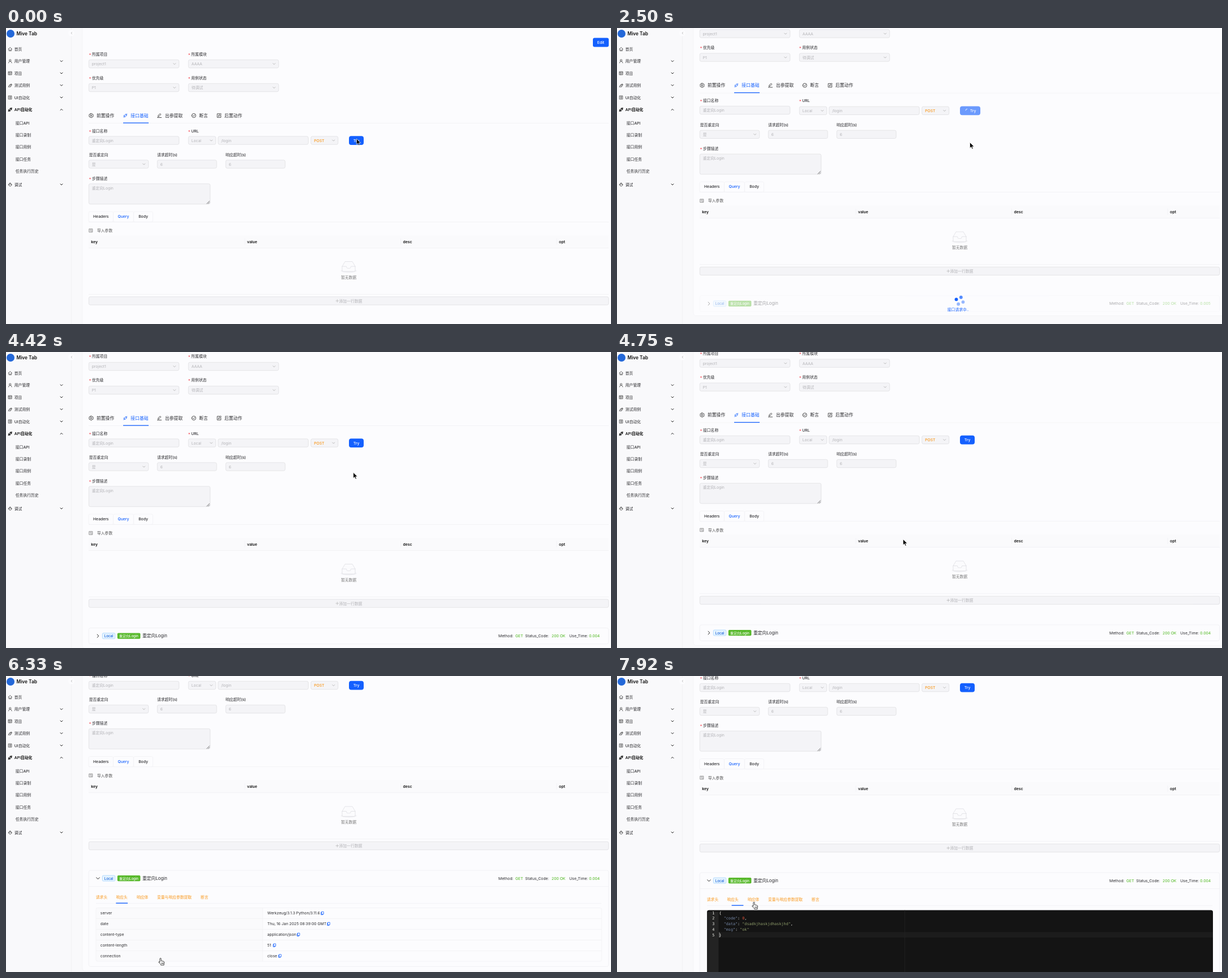
An HTML page for the animation above (8000 ms loop, 1069x524 px).

```html
<!DOCTYPE html>
<html lang="zh-CN">
<head>
<meta charset="utf-8">
<title>API test case</title>
<style>
html, body { margin: 0; width: 100%; height: 100%; overflow: hidden; background: #f9f9fb; }
svg { display: block; width: 100vw; height: 100vh; }
text { font: 6.8px Inter, 'Noto Sans CJK SC', 'Noto Sans CJK', sans-serif; fill: #2b2b2e; white-space: pre; }
.gray { fill: #b3b3b7; }
.dim { fill: #777; }
.med { font-weight: 500; }
.bold { font-weight: 600; fill: #111; }
.big { font-size: 7.8px; }
.mid { text-anchor: middle; }
.white { fill: #fff; }
.blue { fill: #1460fe; }
.green { fill: #4fb81f; }
.orange { fill: #f9981c; font-weight: 500; }
.tag { font-size: 6px; font-weight: 500; }
.code text { font: 6.78px 'DejaVu Sans Mono', monospace; fill: #f0f0ea; }
.icon { fill: none; stroke: #444; stroke-width: .8; stroke-linecap: round; stroke-linejoin: round; }
</style>
</head>
<body>
<svg id="stage" viewBox="0 0 1069 524"></svg>
<script>
const BLUE = '#1460fe', LINE = '#eeeef1';

// Drawing helpers: y of text is its visual centre
const text = (x, y, s, cls = '', more = '') => `<text x="${x}" y="${y + 2.5}" class="${cls}" ${more}>${s}</text>`;
const rect = (x, y, w, h, fill, more = '') => `<rect x="${x}" y="${y}" width="${w}" height="${h}" fill="${fill}" ${more}/>`;
const icon = (x, y, d, more = '') => `<path class="icon" transform="translate(${x} ${y})" d="${d}" ${more}/>`;
const hline = (x1, x2, y) => rect(x1, y, x2 - x1, .6, LINE);
const chevron = (x, y, more) => icon(x, y, 'M-2-1L0 1L2-1', more);
const label = (x, y, s) => text(x, y + 1, '*', 'med', 'style="fill:#f5333f"') + text(x + 5.3, y, s, 'med');
const field = (x, y, w, s, cls = 'gray', h = 15) =>
  rect(x + .3, y + .3, w - .6, h - .6, '#f4f4f7', 'rx="2.6" stroke="#d8d8db" stroke-width=".6"') + text(x + 5.7, y + 7.7, s, cls);
const select = (x, y, w, s, cls) => field(x, y, w, s, cls) + chevron(x + w - 8.3, y + 7.6, 'stroke="#aaa" style="stroke:#aaa"');

const ICONS = {
  home: 'M-3.2 0L0-3L3.2 0M-2.3-.6V3H2.3V-.6M0 3V1',
  user: 'M-2.8 3.2Q-2.6.2 0 .2T2.8 3.2M-1.6-1.5a1.6 1.6 0 1 0 3.2 0a1.6 1.6 0 1 0-3.2 0',
  list: 'M-2.8-2.8H2.8V2.8H-2.8ZM-2.8-1H2.8M-1.2-1V2.8M.3 1H1.6',
  tool: 'M-3 2.5L-1-1H3L1 2.5ZM-1 .8H1M0-1L2-2.6L3-1',
  panel: 'M-2.6-3H2.6V3H-2.6ZM-1.3-1.3H1.3M-1.3.2H1.3M-.6 1.7H.6',
  plug: 'M-3 3L-1.7 1.7M3-3L1.7-1.7M-1.9-.4L.4 1.9Q-1 3.2-2.2 2.2T-1.9-.4ZM1.9.4L-.4-1.9Q1-3.2 2.2-2.2T1.9.4Z',
  bug: 'M-2-1H2V1.4Q2 3 0 3T-2 1.4ZM-1.3-1Q-1.3-3 0-3T1.3-1M-3.2.6H-2M3.2.6H2',
  gear: 'M-1.3 0a1.3 1.3 0 1 0 2.6 0a1.3 1.3 0 1 0-2.6 0M-1-3.6H1L1.5-2.5L3-2.4L3.8-.8L3.1 0L3.8.8L3 2.4L1.5 2.5L1 3.6H-1L-1.5 2.5L-3 2.4L-3.8.8L-3.1 0L-3.8-.8L-3-2.4L-1.5-2.5Z',
  pen: 'M-3.6 3.5H3.6M-2.4 1.6L-2-.4L1.4-3.4L2.8-2L-.6 1.3Z',
  check: 'M-3.6 0a3.6 3.6 0 1 0 7.2 0a3.6 3.6 0 1 0-7.2 0M-1.6 0L-.3 1.3L1.8-1.2',
  edit: 'M1-3.2H-3.3V3.3H3.2V-.4M-1 1L-.7-.6L2.8-3.8L3.9-2.7L.6.7Z',
  load: 'M-2.8-2.8H2.8V2.8H-2.8ZM-1.3-1.2H1M-1.3.4L0 1.3M1.2.3V1.3',
  copy: 'M-1.2-2.6H2.2V1.6H-1.2ZM-1.2-1.4H-2.3V2.8H.8V1.7'
};

function sidebar() {
  const items = [['home', '首页', 37.3], ['user', '用户管理', 58.7], ['list', '项目', 80], ['tool', '测试用例', 101.4],
    ['panel', 'UI自动化', 123], ['plug', 'API自动化', 144.5], ['bug', '调试', 277]];
  const subs = ['接口API', '接口录制', '接口用例', '接口任务', '任务执行历史'];
  return rect(115, 0, .6, 524, '#ededf1')
    + '<circle cx="8" cy="10" r="7" fill="#2468d8"/>'
    + text(18.5, 10.2, 'Mive Tab', 'bold', 'style="font-size:8.3px"')
    + '<circle cx="115.5" cy="9" r="5.5" fill="#fcfcfe"/>' + icon(115.8, 9, 'M.8-1.7L-.8 0L.8 1.7', 'style="stroke:#999;stroke-width:.6"')
    + items.map(([ic, s, y], i) => icon(7.3, y, ICONS[ic], i == 5 ? 'style="stroke:#111;stroke-width:1.1"' : '')
      + text(14.8, y, s, i == 5 ? 'bold' : 'med')
      + (i ? icon(98, y, i == 5 ? 'M-2 1L0-1L2 1' : 'M-2-1L0 1L2-1', 'style="stroke:#222;stroke-width:1"') : '')).join('')
    + subs.map((s, i) => text(16.8, 168 + 21.45 * i, s, 'med')).join('');
}

function topForm() {
  const tabs = [[150.5, 'gear', '前置操作', 160], [210.8, 'plug', '接口基础', 220.3], [271, 'pen', '出参提取', 281],
    [331.8, 'check', '断言', 341.3], [376.5, 'edit', '后置动作', 386]];
  return rect(1037, 17.5, 28, 16, BLUE, 'rx="3"') + text(1051, 25.4, 'Edit', 'mid white med')
    + label(146.7, 46, '所属项目') + select(146, 56, 160, 'project1')
    + label(322, 46, '所属模块') + select(322, 56, 160, 'AAAA')
    + label(146.7, 88, '优先级') + select(146, 98, 160, 'P1')
    + label(322, 88, '用例状态') + select(322, 98, 160, '待调试')
    + hline(146, 1065, 168.3)
    + tabs.map(([x, ic, s, tx], i) => icon(x, 155, ICONS[ic], `style="stroke:${i == 1 ? BLUE : '#222'}"`)
      + text(tx, 155.2, s, 'big med' + (i == 1 ? ' blue' : ''))).join('')
    + rect(207, 167.4, 45, 1.3, BLUE)
    + label(146.7, 182, '接口名称') + field(146, 191.5, 160, '重定向Login') + label(322, 182, 'URL');
}

function lowForm() {
  const cols = [['key', 150.3], ['value', 426], ['desc', 701.5], ['opt', 977]];
  const tabs = [[146, 43.5, 'Headers'], [189.5, 36, 'Query'], [225.5, 34, 'Body']];
  return select(322, 191.5, 49, 'Local') + field(374.5, 191.5, 160, '/login')
    + select(538.5, 191.5, 48.5, 'POST', 'orange')
    + `<rect id="btn" x="606" y="191.2" height="15.8" rx="4" fill="${BLUE}"/>`
    + '<path id="arc" d="M0-3A3 3 0 0 1 3 0" fill="none" stroke="#fff" stroke-width=".8"/>'
    + text(0, 199.1, 'Try', 'mid white med', 'id="try"')
    + text(146.7, 224, '是否重定向', 'med') + select(146, 233.5, 106, '是')
    + text(267, 224, '请求超时(s)', 'med') + field(267, 233.5, 105.5, '6')
    + text(388, 224, '响应超时(s)', 'med') + field(388, 233.5, 105.5, '6')
    + label(146.7, 266, '步骤描述') + field(146, 275.5, 215, '重定向Login', 'gray', 36.5)
    + icon(357, 309, 'M-2.2 2L2.5-2.7M.3 2L2.5-.2', 'style="stroke:#555"')
    + hline(146, 1065, 343)
    + tabs.map(([x, w, s], i) => rect(x, 325, w, 18.3, '#fcfcfe', `rx="2.5" stroke="${LINE}" stroke-width=".6"`)
      + text(x + w / 2, 333.7, s, 'mid med' + (i == 1 ? ' blue' : ''))).join('')
    + icon(150, 358.5, ICONS.load, 'style="stroke:#666;stroke-width:.7"') + text(161, 358.5, '导入参数', '', 'style="fill:#555"')
    + rect(146, 367, 919, 22, '#fafafc') + hline(146, 1065, 389)
    + cols.map(([s, x], i) => text(x, 378, s, 'bold') + (i ? rect(x - 4.3, 372.5, .6, 11, LINE) : '')).join('')
    + '<ellipse cx="605.5" cy="430" rx="14" ry="3.2" fill="#f1f1f4"/>'
    + icon(605.5, 422, 'M-11.5 0L-6.5-8.5H6.5L11.5 0V7Q11.5 9 9.5 9H-9.5Q-11.5 9-11.5 7ZM-11.5 0H-4.5Q-3.5 0-3.5 1.5Q-3.5 3.3-2 3.3H2Q3.5 3.3 3.5 1.5Q3.5 0 4.5 0H11.5', 'style="fill:#fbfbfd;stroke:#d6d6da;stroke-width:.6"')
    + text(605.5, 441.4, '暂无数据', 'mid dim') + hline(146, 1065, 471)
    + rect(146.3, 475.8, 918.4, 14.4, '#f4f4f7', 'rx="2.6" stroke="#d8d8db" stroke-width=".6"')
    + icon(585.3, 483, 'M-2.4 0H2.4M0-2.4V2.4', 'style="stroke:#aaa;stroke-width:.6"')
    + text(588.5, 483, '添加一行数据', 'gray')
    + `<g id="card">${card()}</g>`
    + '<g id="spin">' + '<circle r="2.9" fill="#1460fe"/>'.repeat(4) + text(583.8, 551.5, '接口请求中..', 'blue med') + '</g>';
}

function card() {
  const rows = [['server', 'Werkzeug/3.1.3 Python/3.11.6', 559], ['date', 'Thu, 16 Jan 2025 08:39:00 GMT', 570],
    ['content-type', 'application/json', 516.7], ['content-length', '51', 474.4], ['connection', 'close', 484]];
  const tabs = [['请求头', 158.8], ['响应头', 194.5], ['响应体', 231], ['变量与响应参数提取', 267], ['断言', 344]];
  const table = rect(159, 593, 294, 94.5, '#fafafc')
    + rect(159, 593, 893.5, 94.5, 'none', `rx="3" stroke="${LINE}" stroke-width=".6"`) + rect(453, 593, .6, 94.5, LINE)
    + rows.map(([k, v, x], i) => {
      const y = 602.4 + 18.9 * i;
      return text(166.8, y, k) + text(461.8, y, v) + icon(x, y, ICONS.copy, `style="stroke:${BLUE}"`)
        + (i ? hline(159, 1052, y - 9.4) : '');
    }).join('');
  return '<rect id="frame" x="146.3" y="526.5" width="918.4" rx="3" fill="none" stroke="#eeeef1" stroke-width=".7"/>'
    + icon(162.5, 540.7, 'M-1.4-2.7L1.4 0L-1.4 2.7', 'id="fold" style="stroke:#222;stroke-width:1"')
    + rect(170.3, 535.6, 22.4, 10, '#e6f4ff', 'rx="1.8" stroke="#91caff" stroke-width=".6"') + text(181.5, 540.5, 'Local', 'mid tag', 'style="fill:#0958d9"')
    + rect(196.8, 535.4, 40.6, 10.4, '#58b92c', 'rx="1.8"') + text(217, 540.5, '重定向Login', 'mid tag white')
    + text(241, 540.6, '重定向Login', 'big')
    + text(870, 540.5, 'Method:') + text(900, 540.5, 'GET', 'green') + text(917.3, 540.5, 'Status_Code:')
    + text(964, 540.5, '200 OK', 'green') + text(995.3, 540.5, 'Use_Time:') + text(1030.3, 540.5, '', 'green', 'id="time"')
    + '<clipPath id="clip"><rect id="open" x="146" y="554.5" width="920"/></clipPath><g clip-path="url(#clip)">'
    + hline(146, 1065, 554.6) + hline(159, 1052, 585)
    + tabs.map(([s, x]) => text(x, 574, s, 'orange')).join('')
    + `<rect id="bar" y="583.9" width="20.8" height="1.4" fill="${BLUE}"/>`
    + `<g id="table">${table}</g><g id="editor" class="code">${editor()}</g></g>`;
}

function editor() {
  const span = (s, c) => `<tspan fill="${c}">${s}</tspan>`;
  const key = s => '  ' + span(`"${s}"`, '#7587a6') + ': ', str = s => span(`"${s}"`, '#8f9d6a');
  const lines = ['{', key('code') + span('0', '#e0533a') + ',', key('data') + str('dsadkjhaskjdhaskjhd') + ',', key('msg') + str('ok'), '}'];
  return rect(159, 593, 894, 160, '#141414', 'rx="3.5"') + rect(159, 596, 20.5, 150, '#232323')
    + rect(179.5, 631.8, 873.5, 9.8, '#1c1c1c') + rect(508, 593, .6, 150, '#262626')
    + lines.map((s, i) => text(168.3, 597.6 + 9.75 * i, i + 1) + text(180.5, 597.6 + 9.75 * i, s)).join('')
    + rect(180.5, 632, .8, 9.4, '#a7a7a7');
}

document.getElementById('stage').innerHTML = rect(0, 0, 1069, 524, '#f9f9fb')
  + `<g id="page"><rect id="sheet" x="135" y="-50" width="960" rx="5" fill="#fcfcfe" stroke="#f0f0f4" stroke-width=".6"/>${topForm()}<g id="low">${lowForm()}</g></g>`
  + sidebar()
  + '<path id="arrow" d="M0 0V10.2L2.4 8L4 11.8L5.7 11L4.1 7.4H7.4Z" stroke="#fff" stroke-width=".7"/>'
  + '<path id="hand" d="M2.6 7.5V1.3a1.1 1.1 0 0 1 2.2 0V5l4 .8q1.6.4 1.5 2l-.5 2.7V12.5H4.3V11.3L.6 7.6q-.4-1 .6-1.2zM5.5 8.3V10.4M7 8.3V10.4M8.5 8.3V10.4" fill="#fff" stroke="#111" stroke-width=".8"/>';

const $ = Object.fromEntries([...document.querySelectorAll('[id]')].map(e => [e.id, e]));
const dots = $.spin.querySelectorAll('circle');
const set = (el, o) => { for (const k in o) el.setAttribute(k, o[k]); };
const show = (el, on) => set(el, { visibility: on ? 'visible' : 'hidden' });
const clamp = v => Math.max(0, Math.min(1, v));

// Keys are [time, ...values], eased between neighbours
function track(keys, t) {
  const i = keys.findIndex(k => k[0] > t);
  if (i < 0) return keys[keys.length - 1].slice(1);
  const a = keys[i - 1], b = keys[i], p = (t - a[0]) / (b[0] - a[0]), e = p * p * (3 - 2 * p);
  return a.slice(1).map((v, j) => v + (b[j + 1] - v) * e);
}

const SCROLL = [[0, 0], [2260, 0], [2500, 53.5], [2830, 40], [3250, 37.5], [4350, 37.5], [4750, 43.5], [4920, 43.5],
  [5580, 37.5], [6110, 37.5], [6330, 182.5], [6920, 178.5]];
const POINTER = [[0, 619.3, 196], [80, 619.3, 196], [580, 620.5, 198.5], [920, 620.5, 198.5], [1170, 623.5, 202.5], [4350, 623.5, 202.5],
  [4750, 505.5, 331.5], [4920, 505.5, 331.5], [5580, 154, 501], [5800, 154, 501], [6000, 157, 509], [6110, 157, 509],
  [6330, 273, 499.5], [6920, 202, 407], [7000, 202, 407], [7400, 248, 403], [7750, 242, 400.3]];

function draw(t) {
  const busy = clamp((t - 1500) / 200) * (1 - clamp((t - 3800) / 200));
  const open = 142 * clamp((t - 6110) / 200), body = t >= 7920;
  const right = 632 + 10 * busy;

  set($.page, { transform: `translate(0 ${-track(SCROLL, t)[0]})` });
  set($.low, { transform: `translate(0 ${.8 * clamp(busy * 3)})` });
  set($.sheet, { height: 613 + open + (body ? 60 : 0) });

  set($.btn, { width: right - 606, 'fill-opacity': 1 - .38 * busy });
  set($.try, { x: right - 13 });
  set($.arc, { transform: `translate(619 199) rotate(${t * .36 + 90})`, opacity: clamp(busy * 2 - 1) });

  show($.card, t >= 2260);
  set($.card, { opacity: .4 + .6 * clamp((t - 3800) / 200) });
  $.time.textContent = t < 3800 ? '0.005' : '0.004';
  set($.frame, { height: 28.3 + open + (body ? 60 : 0) });
  set($.open, { height: open + (body ? 60 : 0) });
  set($.fold, { transform: `translate(162.5 ${540.7}) rotate(${90 * open / 142})` });
  set($.bar, { x: 194.3 + (body ? 36.5 * clamp((t - 7853) / 300) : 0) });
  set($.table, { display: body ? 'none' : 'inline' });
  set($.editor, { display: body ? 'inline' : 'none' });

  show($.spin, t >= 2260 && t < 3800);
  dots.forEach((dot, i) => {
    const a = (291 + 90 * i + .3 * (t - 2500)) * Math.PI / 180;
    const phase = (5 + (t - 2500) / 1000 - .4 * i) % 2;
    set(dot, { cx: 605.5 + 6.4 * Math.sin(a), cy: 535.4 - 6.4 * Math.cos(a), opacity: .3 + .7 * (1 - Math.abs(1 - phase)) });
  });

  const [x, y] = track(POINTER, t), hand = t >= 5500;
  show($.arrow, !hand);
  show($.hand, hand);
  set($.arrow, { transform: `translate(${x} ${y})` });
  set($.hand, { transform: `translate(${x - 3.7} ${y - .2})` });
}

const start = performance.now();
function tick() {
  draw((performance.now() - start) % 8000);
  requestAnimationFrame(tick);
}
tick();
</script>
</body>
</html>
```
